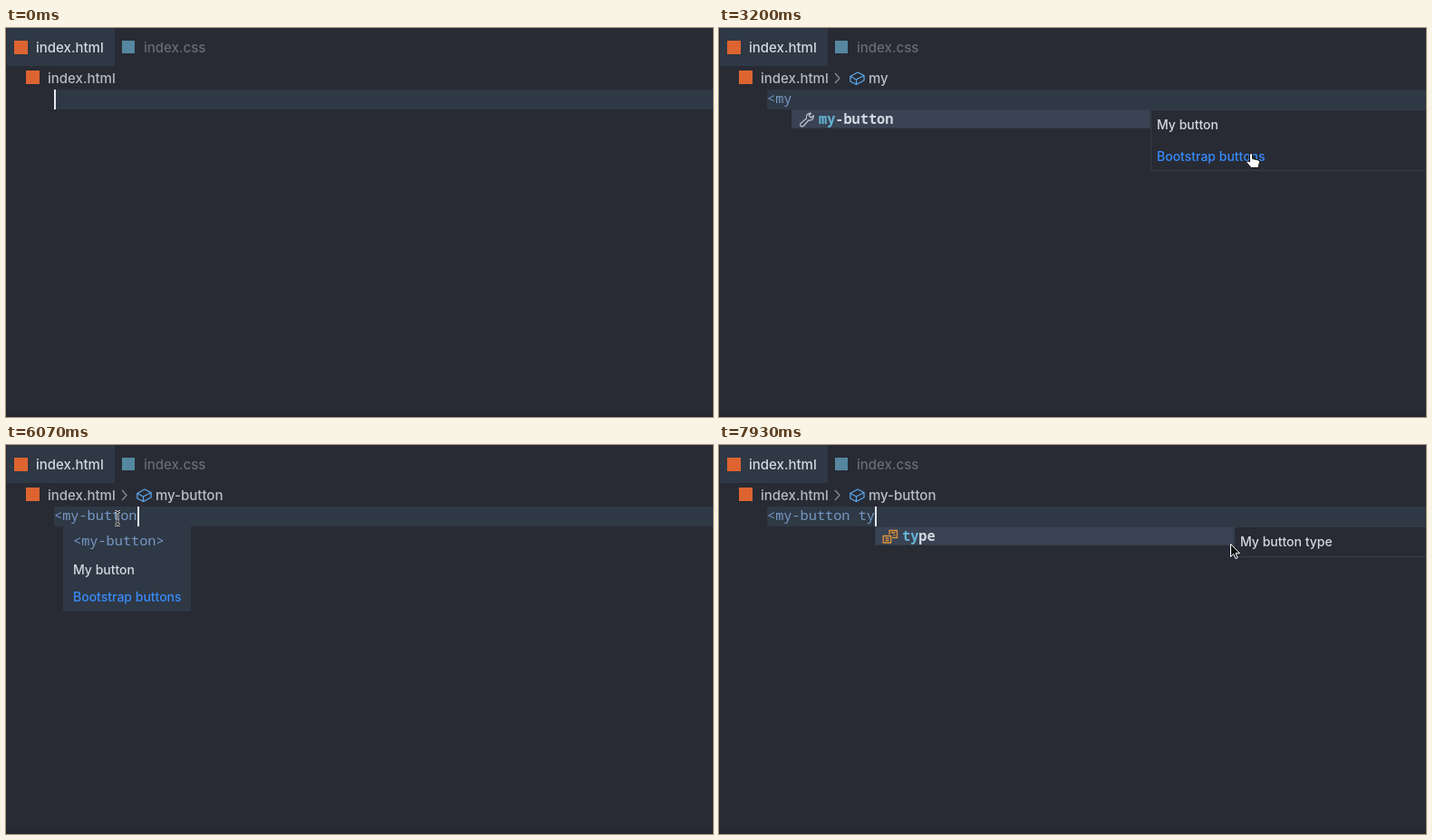
Write an HTML page that moves like this. It is 780 px wide and 430 px high and loops after 8 s.

```html
<!DOCTYPE html>
<html lang="en">
<head>
<meta charset="utf-8">
<title>Editor completion</title>
<style>
html, body { margin: 0; width: 100%; height: 100%; overflow: hidden; background: #282b34; }
svg { display: block; }
text { white-space: pre; }
.ui { font: 500 15px Inter, "Open Sans", sans-serif; }
.doc { font: 500 14px Inter, "Open Sans", sans-serif; }
.code { font: 500 15.25px "Noto Sans Mono", "DejaVu Sans Mono", monospace; }
.item { font: 600 15.25px "Noto Sans Mono", "DejaVu Sans Mono", monospace; }
</style>
</head>
<body>
<svg id="stage" width="780" height="430" viewBox="0 0 780 430"></svg>
<script>
const LOOP = 8000, ROW = 21.65;
const BG = '#282b34', RAISED = '#2f3845', SELECTED = '#394354', BORDER = '#353c48';
const TAG = '#7698c5', LIGHT = '#d3d8e2', LINK = '#388bfd', MATCH = '#65b5d5';

const icons = {
  wrench: ['M1.5 12.5L8 7C7 3.5 9.5 .8 13 1.3L10.7 3.8L13 6.2L15.8 3.8C16.5 7.5 13.5 9.7 10.3 9L4.5 15.5C2.5 17 0 14.5 1.5 12.5Z', '#b9bec8'],
  field: ['M7.5 6V1.5H16V9.5H10.5M9.5 4H14M12 6.7H14M.7 7.5H9.2V15H.7ZM3 10H7M3 12.5H7', '#e2933a'],
  cube: ['M.8 5.5L9 1L16 4.5V10L7.5 14.5L.8 11ZM.8 5.5L7.5 9L16 4.5M7.5 9V14.5', '#5ba5ea'],
  chevron: ['M0 0L5 5.5L0 11', '#858b98']
};

const tags = '!DOCTYPE a abbr address area article aside audio b base bdi bdo'.split(' ');
const mTags = 'main map mark menu menuitem meta meter my-button'.split(' ');
const attrs = ('type accesskey aria-activedescendant aria-atomic aria-autocomplete aria-busy ' +
  'aria-checked aria-colcount aria-colindex aria-colspan aria-controls aria-current').split(' ');

// Each list holds the state from its time on.
const typing = [
  [-250, ''], [850, '<'], [1400, '<m'], [1650, '<my'], [4050, '<my-button'],
  [6400, '<my-button '], [6650, '<my-button t'], [6800, '<my-button ty']
];
const crumbs = [[0, ''], [1750, '?'], [2400, 'my'], [4520, 'my-button']];
const popups = [
  [0, null],
  [1000, { col: 1, items: tags, hit: 0, docs: ['A preamble for an HTML document.'] }],
  [1430, { col: 2, items: mTags, hit: 1, docs: [] }],
  [1680, { col: 3, items: ['my-button'], hit: 2, docs: ['My button', 'Bootstrap buttons'] }],
  [4050, null],
  [6450, { col: 11, items: attrs, hit: 0, docs: [], icon: 'field' }],
  [6680, { col: 12, items: ['type', 'tabindex', 'title', 'translate'], hit: 1, docs: [], icon: 'field' }],
  [6830, { col: 13, items: ['type'], hit: 2, docs: ['My button type'], icon: 'field' }]
];
// Pointer strokes: time, x, y; each stroke hides after its last point.
const strokes = [
  [[2400, 190, 112], [2900, 587, 138], [3900, 587, 138], [4250, 146, 77], [4450, 146, 77],
   [4700, 123, 81], [6400, 123, 81]],
  [[7350, 180, 100], [7850, 564, 109], [8000, 564, 109]]
];

const current = (list, t) => list.filter(e => e[0] <= t).pop();
const ease = p => p * p * (3 - 2 * p);
const col = n => 53 + 9.15 * n;
const rect = (x, y, w, h, fill, more = '') =>
  `<rect x="${x}" y="${y}" width="${w}" height="${h}" fill="${fill}" ${more}/>`;
const outline = (x, y, w, h) => rect(x, y, w, h, 'none', `stroke="${BORDER}"`);
const esc = s => s.replace(/</g, '&lt;');
const text = (x, y, s, fill, cls) => `<text x="${x}" y="${y}" fill="${fill}" class="${cls}">${s}</text>`;
const icon = (name, x, y) => {
  const [d, color] = icons[name];
  return `<path transform="translate(${x} ${y})" d="${d}" fill="none" stroke="${color}" stroke-width="1.3" stroke-linejoin="round"/>`;
};

function frame(crumb) {
  let s = rect(0, 0, 780, 430, BG) + rect(0, 425, 780, 5, '#252830') +
    rect(1, 0, 119, 42, RAISED) + rect(53, 68, 727, 22, RAISED) +
    rect(9, 14, 15, 15, '#dd6430') + text(33, 26.5, 'index.html', LIGHT, 'ui') +
    rect(128, 14, 14, 14, '#5587a0') + text(152, 26.5, 'index.css', '#666b77', 'ui') +
    rect(22, 47, 15, 15, '#dd6430') + text(46, 60.5, 'index.html', '#b4bac6', 'ui');
  if (crumb) s += icon('chevron', 128, 50) + icon('cube', 144, 48) + text(165, 60.5, crumb, '#b9bfca', 'ui');
  return s;
}

function completion({ col: n, items, hit, docs, icon: kind = 'wrench' }) {
  const x = Math.round(col(n)), h = Math.round(items.length * ROW) - 2;
  let s = rect(x, 90, 396, h, BG) + rect(x, 91, 396, Math.min(ROW, h), SELECTED) + outline(x + .5, 90.5, 395, h);
  items.forEach((name, i) => {
    const y = 106 + i * ROW;
    const label = `<tspan fill="${MATCH}">${name.slice(0, hit)}</tspan>${name.slice(hit)}`;
    s += icon(kind, x + 8.5, y - 13) + text(x + 30, y, label, LIGHT, 'item');
  });
  if (docs.length) {
    s += rect(x + 396, 90, 400, docs.length * 34, BG) + outline(x + 396.5, 90.5, 400, docs.length * 34 - 1);
    docs.forEach((d, i) => s += text(x + 403, 112 + i * 35, d, i ? LINK : LIGHT, 'doc'));
  }
  return s;
}

function hover(t) {
  if (t < 4950 || t >= 6200) return '';
  return `<g opacity="${Math.min(1, (t - 4950) / 100)}">` + rect(63, 90, 141, 94, RAISED) +
    text(74, 111, '&lt;my-button>', TAG, 'code') + text(74, 143, 'My button', LIGHT, 'doc') +
    text(74, 173, 'Bootstrap buttons', LINK, 'doc') + '</g>';
}

function pointer(t) {
  const path = strokes.find(p => t >= p[0][0] && t < p[p.length - 1][0]);
  if (!path) return '';
  const i = path.findIndex(p => p[0] > t), [t0, x0, y0] = path[i - 1], [t1, x1, y1] = path[i];
  const p = ease((t - t0) / (t1 - t0)), x = x0 + (x1 - x0) * p, y = y0 + (y1 - y0) * p;
  const beam = 'M-3 -7.5Q0 -7.5 0 -5.5V5.5Q0 7.5 -3 7.5M3 -7.5Q0 -7.5 0 -5.5V5.5Q0 7.5 3 7.5M-1.5 3H1.5';
  let shape;
  if (y < 90) {
    shape = `<path d="${beam}" fill="none" stroke="#fff" stroke-width="2.6"/><path d="${beam}" fill="none" stroke="#111" stroke-width="1.1"/>`;
  } else if (x > 483 && y > 130) {
    shape = '<path d="M-1.5 10V1.5Q0 -.5 1.5 1.5V6.5L8 8Q9.5 8.5 9.5 10L8 16.5H0L-5 10.5Q-4.5 8 -1.5 10Z" fill="#fff" stroke="#111"/>';
  } else {
    shape = '<path d="M.5 .5V14.5L3.7 11.5L6 16.6L8.2 15.6L6 10.7H10.5Z" fill="#111" stroke="#fff"/>';
  }
  return `<g transform="translate(${x.toFixed(2)} ${y.toFixed(2)})">${shape}</g>`;
}

function scene(t) {
  const [since, typed] = current(typing, t), list = current(popups, t)[1];
  let s = frame(current(crumbs, t)[1]) +
    text(53, 83, esc(typed), typed === '<' ? '#c3c9d4' : TAG, 'code');
  if ((t - since) % 1000 < 500) s += rect(Math.round(col(typed.length)), 68, 2, 22, '#e4e8ef');
  if (list) s += completion(list);
  return s + hover(t) + pointer(t);
}

const stage = document.getElementById('stage');
let shown;
function draw() {
  const s = scene(performance.now() % LOOP);
  if (s !== shown) stage.innerHTML = shown = s;
  requestAnimationFrame(draw);
}
draw();
</script>
</body>
</html>
```
